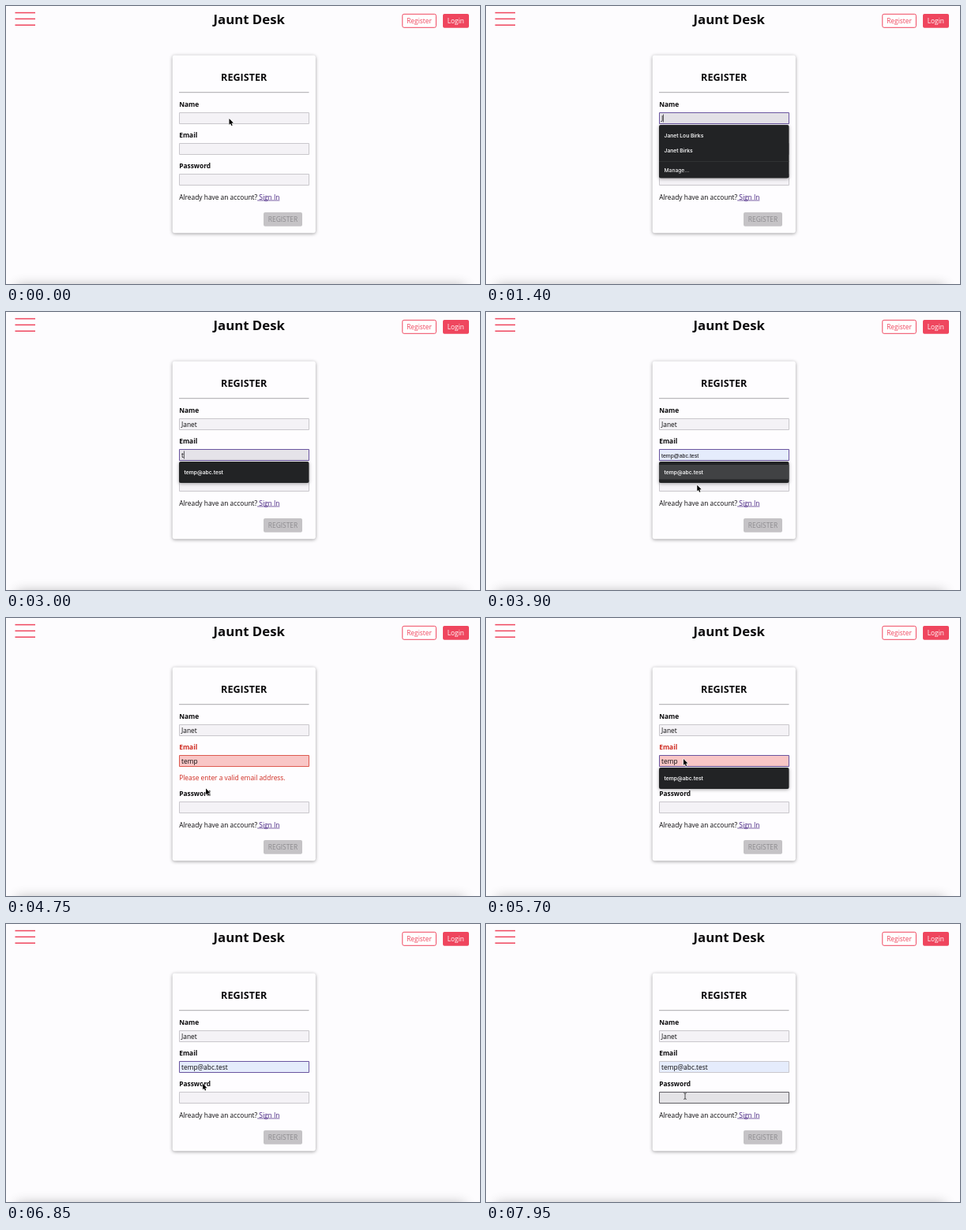
An HTML page with a canvas for the animation above (8000 ms loop, 600 by 353 pixels).

```html
<!DOCTYPE html>
<html lang="en">
<head>
<meta charset="utf-8">
<title>Register form</title>
<style>
html, body { margin: 0; width: 100%; height: 100%; overflow: hidden; background: #fdfcfe; }
canvas { display: block; width: 600px; height: 353px; }
</style>
</head>
<body>
<canvas id="stage"></canvas>
<script>
const W = 600, H = 353, LOOP = 8000, STEP = 50;
const canvas = document.getElementById('stage');
const ctx = canvas.getContext('2d');
const dpr = window.devicePixelRatio || 1;
canvas.width = W * dpr;
canvas.height = H * dpr;

const SANS = '"Open Sans", sans-serif';
const BODY = '8.4px ' + SANS;
const BOLD = 'bold 8.4px ' + SANS;
const MENU = '600 6.7px Inter, sans-serif';
const PREVIEW = '7px "Liberation Sans", Arial, sans-serif';
const PINK = '#ef465e', RED = '#cf2a20', INK = '#0b0a0c', FOCUS = '#6a55a0';
const NAME = 'Janet', EMAIL = 'temp@abc.test';

// Typing: when each letter lands
const NAME_KEYS = [1250, 1500, 1650, 1800, 1950];
const EMAIL_KEYS = [2900, 3050, 3200, 3350];

// Pointer path: time, x, y
const PATH = [
  [0, 282.5, 143], [3450, 282.5, 143], [3600, 279, 165], [3750, 271, 203],
  [3850, 267.5, 217.5], [4050, 266, 232], [4300, 266, 232], [4700, 253, 216.5],
  [4850, 253, 216.5], [5150, 250, 179], [5800, 250, 179], [6150, 248.5, 200.5],
  [6700, 248.5, 200.5], [7300, 252, 214], [8000, 252, 214]
];

const between = (t, a, b) => t >= a && t < b;
const typed = (word, keys, t) => word.slice(0, keys.filter(k => k <= t).length);

function pointerAt(t) {
  const i = Math.max(1, PATH.findIndex(p => p[0] > t));
  const [t0, x0, y0] = PATH[i - 1], [t1, x1, y1] = PATH[i];
  const u = (t - t0) / (t1 - t0), e = u * u * (3 - 2 * u);
  return { x: x0 + (x1 - x0) * e, y: y0 + (y1 - y0) * e };
}

function text(str, x, y, font, color, align = 'left') {
  ctx.font = font;
  ctx.fillStyle = color;
  ctx.textAlign = align;
  ctx.fillText(str, x, y);
  return ctx.measureText(str).width;
}

function box(x, y, w, h, r, fill, stroke) {
  ctx.beginPath();
  ctx.roundRect(x, y, w, h, r);
  if (fill) { ctx.fillStyle = fill; ctx.fill(); }
  if (stroke) { ctx.strokeStyle = stroke; ctx.lineWidth = 1; ctx.stroke(); }
}

function shadowed(color, blur, dy, draw) {
  ctx.save();
  ctx.shadowColor = color;
  ctx.shadowBlur = blur * dpr;
  ctx.shadowOffsetY = dy * dpr;
  draw();
  ctx.restore();
}

function header() {
  ctx.fillStyle = PINK;
  for (const y of [7.8, 15.6, 23.5]) ctx.fillRect(11.5, y, 25.5, 1.5);
  text('Jaunt Desk', 307.7, 23, 'bold 16.8px ' + SANS, INK, 'center');
  box(501.8, 10.3, 42.6, 17, 2, '#fff', PINK);
  text('Register', 523, 21.8, BODY, PINK, 'center');
  box(553, 10, 33, 17.7, 2, PINK);
  text('Login', 569.3, 21.8, BODY, '#fff', 'center');
}

function field(y, value, { fill = '#f4f2f6', border = '#c9c7cc', font = BODY, caret = false } = {}) {
  box(219.5, y + .5, 164, 14, 0, fill, border);
  const w = text(value, 222, y + 10.5, font, INK);
  if (caret) {
    ctx.fillStyle = '#222';
    ctx.fillRect(222 + w, y + 2.5, .7, 10);
  }
}

function menu(y, h, rows, hover) {
  shadowed('rgba(0,0,0,.35)', 4, 1, () => box(219, y, 164.5, h, 2, '#222325'));
  if (hover) {
    ctx.fillStyle = '#414244';
    ctx.fillRect(219, y + 4, 164.5, 18.5);
  }
  rows.forEach((row, i) => text(row, 225.5, y + 15.8 + i * 19, MENU, '#f0f0f1'));
}

function pointer(x, y, beam) {
  ctx.save();
  ctx.translate(x, y);
  ctx.beginPath();
  ctx.lineJoin = 'round';
  if (beam) {
    ctx.moveTo(-1.7, .6); ctx.quadraticCurveTo(0, .6, 0, 1.8);
    ctx.quadraticCurveTo(0, .6, 1.7, .6);
    ctx.moveTo(0, 1.8); ctx.lineTo(0, 7.4);
    ctx.moveTo(-1.7, 8.5); ctx.quadraticCurveTo(0, 8.5, 0, 7.3);
    ctx.quadraticCurveTo(0, 8.5, 1.7, 8.5);
    ctx.strokeStyle = '#222';
    ctx.lineWidth = .8;
    ctx.stroke();
  } else {
    const shape = [[0, 0], [0, 7.7], [1.7, 6.2], [2.9, 9], [4.2, 8.4], [3, 5.7], [5.4, 5.6]];
    shape.forEach(([px, py]) => ctx.lineTo(px, py));
    ctx.closePath();
    ctx.strokeStyle = '#fff';
    ctx.lineWidth = 1.1;
    ctx.stroke();
    ctx.fillStyle = '#000';
    ctx.fill();
  }
  ctx.restore();
}

function stateAt(t) {
  const emailMenu = between(t, 2900, 4150) || between(t, 5600, 6500);
  const preview = between(t, 3700, 3950) || between(t, 6050, 6500);
  const filled = t >= 6500;
  return {
    emailMenu, preview, filled,
    nameMenu: between(t, 1250, 2300),
    invalid: between(t, 4150, 6500),
    nameFocus: between(t, 450, 2300),
    emailFocus: between(t, 2300, 4150) || between(t, 5300, 7500),
    passFocus: t >= 7500,
    blink: t % 1000 < 500,
    name: typed(NAME, NAME_KEYS, t),
    email: preview || filled ? EMAIL : typed(EMAIL, EMAIL_KEYS, t)
  };
}

function form(s) {
  const dy = s.invalid ? 20 : 0;
  shadowed('rgba(0,0,0,.38)', 4.5, 1, () => box(210.7, 62.6, 181.2, 225.6 + dy, 3, '#fefdff'));
  text('REGISTER', 301.2, 95.2, 'bold 12.6px ' + SANS, INK, 'center');
  ctx.fillStyle = '#aaa8ac';
  ctx.fillRect(219, 109.2, 164.5, 1);

  text('Name', 219.2, 128, BOLD, INK);
  field(135, s.name, s.nameFocus
    ? { fill: '#e3e1e7', border: FOCUS, caret: s.blink } : {});

  text('Email', 219.2, 167, BOLD, s.invalid ? RED : INK);
  const look = { caret: s.emailFocus && !s.preview && s.blink };
  if (s.emailFocus) Object.assign(look, { fill: '#e5e3e9', border: FOCUS });
  if (s.invalid) look.fill = '#f9c6c6';
  if (s.invalid && !s.emailFocus) look.border = '#dd5a50';
  if (s.preview || s.filled) look.fill = '#e5ecfc';
  if (s.preview) look.font = PREVIEW;
  field(174, s.email, look);

  if (s.invalid) text('Please enter a valid email address.', 219.2, 206, BODY, RED);
  text('Password', 219.2, 206.2 + dy, BOLD, INK);
  field(213 + dy, '', s.passFocus ? { fill: '#e4e3e6', border: '#626066' } : {});

  const w = text('Already have an account?', 219.2, 245.6 + dy, BODY, INK);
  const lw = text(' Sign In', 219.2 + w, 245.6 + dy, BODY, '#43207f');
  ctx.fillRect(219.2 + w, 246.6 + dy, lw, .7);

  box(326, 262 + dy, 49, 17.8, 2, '#c5c3c6');
  text('REGISTER', 350.5, 274 + dy, BODY, '#8c8a8e', 'center');
}

function draw(t) {
  const s = stateAt(t);
  ctx.setTransform(dpr, 0, 0, dpr, 0, 0);
  ctx.fillStyle = '#fdfcfe';
  ctx.fillRect(0, 0, W, H);
  shadowed('rgba(0,0,0,.3)', 15, 0, () => box(14, 355, 566, 20, 0, '#ddd'));
  header();
  form(s);

  if (s.nameMenu) {
    menu(151, 67.5, ['Janet Lou Birks', 'Janet Birks']);
    ctx.fillStyle = '#37383a';
    ctx.fillRect(219, 197, 164.5, .7);
    text('Manage...', 225.5, 210.5, '500 6.7px Inter, sans-serif', '#f0f0f1');
  }
  if (s.emailMenu) menu(190, 27, [EMAIL], s.preview);

  if (between(t, 1250, 3450)) return;
  const p = pointerAt(t);
  const passY = s.invalid ? 233 : 213;
  const overField = [135, 174, passY].some(y => between(p.y, y, y + 15));
  pointer(p.x, p.y, t >= 50 && overField && !s.emailMenu);
}

function loop(now) {
  const t = now % LOOP;
  draw(t - t % STEP);
  requestAnimationFrame(loop);
}
requestAnimationFrame(loop);
</script>
</body>
</html>
```
